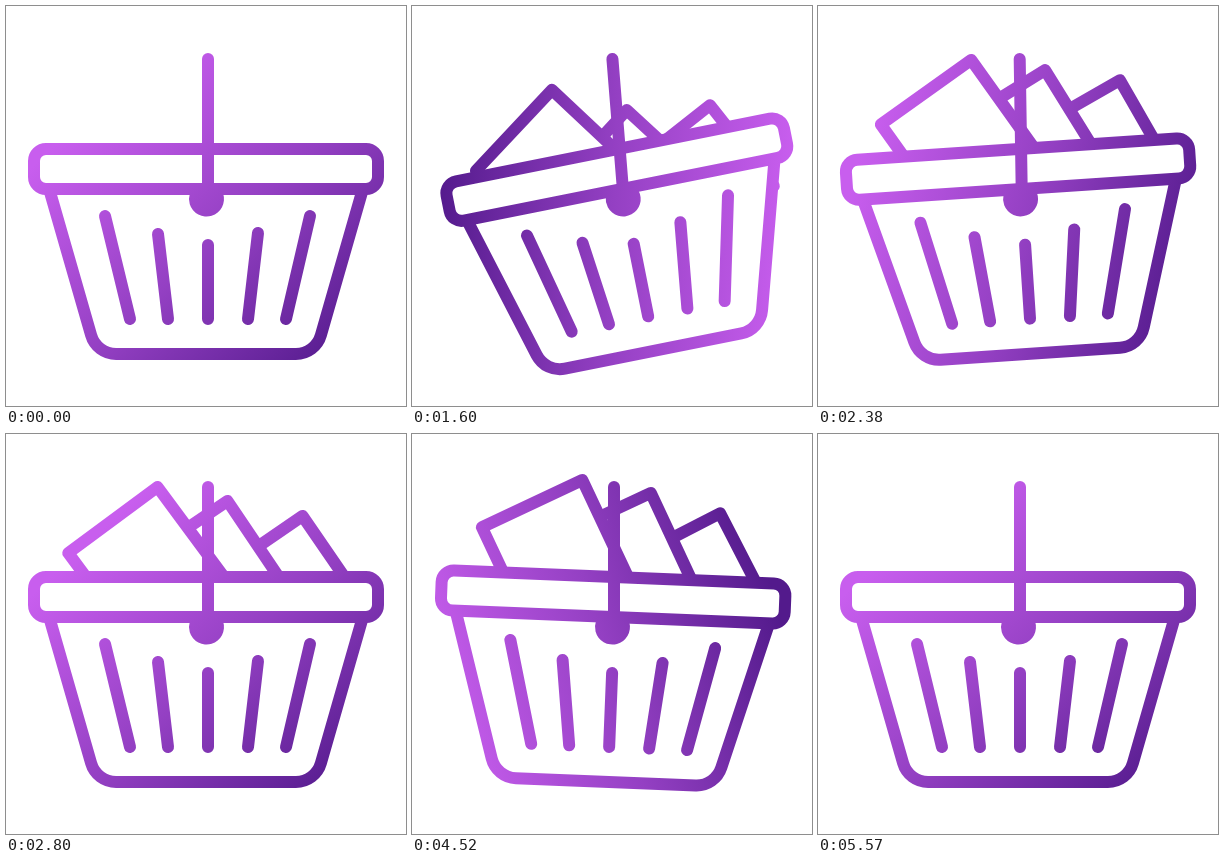
An HTML page with a canvas that plays this animation: 400 by 400 pixels, repeating every 5.66 s.

```html
<!DOCTYPE html>
<html>
<head>
<meta charset="utf-8">
<title>Shopping basket</title>
<style>
  html, body { margin: 0; height: 100%; overflow: hidden; background: #fff; }
  canvas { display: block; }
</style>
</head>
<body>
<canvas id="stage" width="400" height="400"></canvas>
<script>
const ctx = document.getElementById('stage').getContext('2d');
const LOOP = 5660, STEP = 30, LAST = 58;
const FILL_START = 1090, EMPTY_START = 3860;
const HUB = { x: 200.5, y: 192 };

// Key poses: [step, ...values]
const tiltKeys = [[4, 0], [15, -13], [18, -11.3], [29, 4.5], [35, 2.3], [44, -3.8], [58, 0]];
const swayKeys = [[4, 0], [15, 11.5], [18, 10.5], [29, -1.5], [35, 0], [44, 2], [58, 0]];
const spinKeys = [[3, 0], [18, 135], [35, 297], [44, 330], [58, 360]];

// Each box is placed by its top right corner relative to the hub: x, y, angle
const boxes = [
  { w: 80, h: 103, keys: [[4, 124, -325, 0], [12, 105, -70, -26], [14, 103, -58, -28], [18, 103.5, -74, -27],
    [28, 100, -120, -27], [35, 103, -117, -29.5], [44, 107, -111, -26], [58, 96, -110, -34.5]] },
  { w: 95, h: 105, keys: [[2, 58, -325, 0], [10, 30, -90, -35], [13, 22, -68, -38], [18, 21, -85.5, -36],
    [28, 30, -140, -28], [35, 33, -134.5, -27.3], [44, 33, -126, -28], [58, 21, -125, -34]] },
  { w: 111, h: 111, keys: [[0, -2, -312, 0], [1, -2, -282, 0], [8, -30, -115, -25], [11, -46, -98, -38],
    [18, -48.5, -120, -35.5], [27, -38, -153, -27], [35, -36, -144.7, -27.5], [44, -40, -141, -31.7],
    [58, -49, -139, -36.5]] }
];

const slats = [[99, 210, 124], [152, 228, 162], [202, 239, 202], [252, 227, 242], [304, 210, 280]];

const rad = deg => deg * Math.PI / 180;

// Smooth cubic through the keys, at rest at both ends
function sample(keys, s, k = 1) {
  const n = keys.length - 1;
  if (s <= keys[0][0]) return keys[0][k];
  if (s >= keys[n][0]) return keys[n][k];
  const i = keys.findIndex(key => key[0] > s) - 1;
  const slope = j => j === 0 || j === n ? 0 :
    (keys[j + 1][k] - keys[j - 1][k]) / (keys[j + 1][0] - keys[j - 1][0]);
  const [a, b] = [keys[i], keys[i + 1]];
  const d = b[0] - a[0], u = (s - a[0]) / d, v = 1 - u;
  return a[k] * (1 + 2 * u) * v * v + b[k] * (3 - 2 * u) * u * u
    + d * u * v * (slope(i) * v - slope(i + 1) * u);
}

function stepAt(t) {
  if (t < FILL_START) return 0;
  if (t < EMPTY_START) return Math.min(LAST, Math.floor((t - FILL_START) / STEP) + 1);
  return Math.max(0, LAST - 1 - Math.floor((t - EMPTY_START) / STEP));
}

// The gradient stays fixed on the stage while shapes move through it
function makeGradient(spin) {
  const a = rad(227 + spin), dx = 178 * Math.cos(a), dy = 178 * Math.sin(a);
  const g = ctx.createLinearGradient(200 + dx, 242 + dy, 200 - dx, 242 - dy);
  g.addColorStop(0, '#c85eee');
  g.addColorStop(0.5, '#9440c3');
  g.addColorStop(1, '#531a8c');
  return g;
}

function paint(path, matrix, gradient, filled) {
  const placed = new Path2D();
  placed.addPath(path, matrix);
  if (filled) {
    ctx.fillStyle = filled;
    ctx.fill(placed);
  }
  ctx.strokeStyle = gradient;
  if (filled !== gradient) ctx.stroke(placed);
}

function shape(build) {
  const p = new Path2D();
  build(p);
  return p;
}

const body = shape(p => {
  p.moveTo(44, 186);
  p.arcTo(90.5, 348, 200, 348, 26);
  p.arcTo(309.5, 348, 356, 186, 26);
  p.lineTo(356, 186);
});
const rim = shape(p => p.roundRect(28, 143, 344, 40, 12));
const hub = shape(p => p.arc(HUB.x, 193, 17.5, -0.3, Math.PI + 0.3));
const ribs = shape(p => slats.forEach(([x1, y1, x2]) => {
  p.moveTo(x1, y1);
  p.lineTo(x2, 313);
}));

function draw(s) {
  const sway = sample(swayKeys, s);
  const gradient = makeGradient(sample(spinKeys, s));
  const hubFrame = new DOMMatrix().translate(HUB.x + sway, HUB.y).rotate(sample(tiltKeys, s));
  const basket = hubFrame.translate(-HUB.x, -HUB.y);

  ctx.fillStyle = '#fff';
  ctx.fillRect(0, 0, 400, 400);
  ctx.lineWidth = 12;
  ctx.lineCap = ctx.lineJoin = 'round';

  for (const { w, h, keys } of boxes) {
    const pose = hubFrame.translate(sample(keys, s, 1), sample(keys, s, 2)).rotate(sample(keys, s, 3));
    paint(shape(p => p.rect(-w, 0, w, h)), pose, gradient, '#fff');
  }
  paint(body, basket, gradient, '#fff');
  paint(ribs, basket, gradient);
  paint(hub, basket, gradient, gradient);
  paint(rim, basket, gradient, '#fff');

  const handle = shape(p => {
    p.moveTo(202 - sway * 0.15, 53);
    p.lineTo(202 + sway * 0.9, 190);
  });
  paint(handle, new DOMMatrix(), gradient);
}

function tick() {
  draw(stepAt(performance.now() % LOOP));
  requestAnimationFrame(tick);
}
tick();
</script>
</body>
</html>
```
